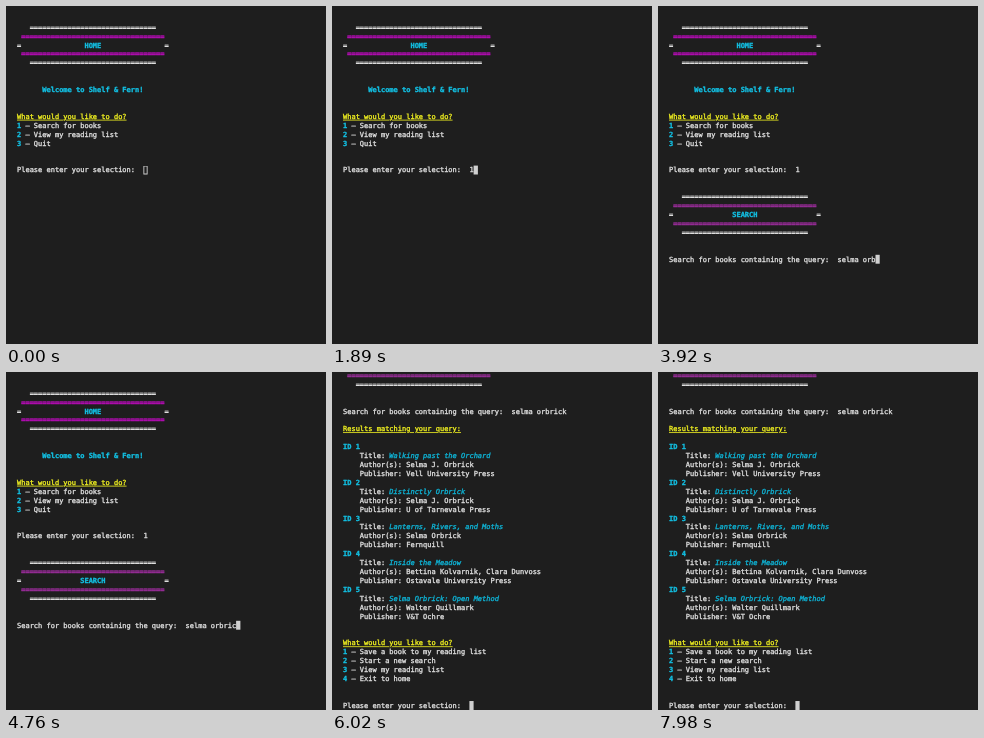
An HTML page that plays this animation: 320 by 338 pixels, repeating every 8000 ms.

```html
<!DOCTYPE html>
<html lang="en">
<head>
<meta charset="utf-8">
<title>Reading list terminal</title>
<style>
  html, body { margin: 0; width: 100%; height: 100%; overflow: hidden; background: #1e1e1e; }
  /* Set at ten times the size, so that the small cell grid stays exact. */
  #screen {
    position: absolute; left: 11px; top: -0.9px; margin: 0;
    font: 70px/89.2px "DejaVu Sans Mono", monospace;
    color: #dedede; white-space: pre;
    text-rendering: geometricPrecision;
    -webkit-text-stroke: 3.5px currentColor;
    transform-origin: 0 0;
  }
  b { color: #12bfe2; }
  i { color: #0eb2d4; }
  u { color: #f0f020; text-decoration-thickness: 8px; text-underline-offset: 9px; }
  .home, .search { font-weight: bold; -webkit-text-stroke-width: 5px; }
  .home { color: #b40cb4; }
  .search { color: #982c98; }
  .cursor { display: inline-block; width: 1ch; height: 89.2px; vertical-align: top; background: #cfcfcf; }
  .cursor.hollow { background: none; box-shadow: inset 0 0 0 9px #cfcfcf; }
</style>
</head>
<body>
<pre id="screen"></pre>
<script>
const LOOP = 8000, ROWS = 38, ROW_HEIGHT = 8.92;
const FOCUS = 980, PICK = 1610, OPEN_SEARCH = 2100, SUBMIT = 5040, RESULTS = 6020;
const QUERY = 'selma orbrick';
const KEY_TIMES = [2800, 2940, 3080, 3220, 3290, 3430, 3570, 3710, 3850, 4130, 4620, 4760, 4830];

const gap = n => ' '.repeat(n);
const bar = n => '='.repeat(n);

function banner(title, tone) {
  const left = Math.floor((34 - title.length) / 2);
  const outer = gap(3) + bar(30);
  const inner = ` <span class="${tone}">${bar(34)}</span>`;
  const middle = `=${gap(left)}<b>${title}</b>${gap(34 - left - title.length)}=`;
  return [outer, inner, middle, inner, outer].join('\n');
}

const menu = options => '<u>What would you like to do?</u>\n' +
  options.map((text, i) => `<b>${i + 1}</b> – ${text}\n`).join('') +
  '\n\nPlease enter your selection:  ';

const books = [
  ['Walking past the Orchard', 'Selma J. Orbrick', 'Vell University Press'],
  ['Distinctly Orbrick', 'Selma J. Orbrick', 'U of Tarnevale Press'],
  ['Lanterns, Rivers, and Moths', 'Selma Orbrick', 'Fernquill'],
  ['Inside the Meadow', 'Bettina Kolvarnik, Clara Dunvoss', 'Ostavale University Press'],
  ['Selma Orbrick: Open Method', 'Walter Quillmark', 'V&amp;T Ochre'],
];

const bookEntry = ([title, author, publisher], i) =>
  `<b>ID ${i + 1}</b>\n` +
  `    Title: <i>${title}</i>\n` +
  `    Author(s): ${author}\n` +
  `    Publisher: ${publisher}\n`;

const home = '\n\n' + banner('HOME', 'home') +
  `\n\n\n${gap(6)}<b>Welcome to Shelf &amp; Fern!</b>\n\n\n` +
  menu(['Search for books', 'View my reading list', 'Quit']);

const search = '\n\n\n' + banner('SEARCH', 'search') +
  '\n\n\nSearch for books containing the query:  ';

const results = '\n<u>Results matching your query:</u>\n\n' +
  books.map(bookEntry).join('') + '\n\n' +
  menu(['Save a book to my reading list', 'Start a new search', 'View my reading list', 'Exit to home']);

function terminalText(t) {
  let text = home;
  if (t >= PICK) text += '1';
  if (t >= OPEN_SEARCH) text += search + QUERY.slice(0, KEY_TIMES.filter(time => time <= t).length);
  if (t >= SUBMIT) text += '\n';
  if (t >= RESULTS) text += results;
  return text + `<span class="cursor${t < FOCUS ? ' hollow' : ''}"></span>`;
}

const screenEl = document.getElementById('screen');
let shown = '';

function draw() {
  const text = terminalText(performance.now() % LOOP);
  if (text !== shown) {
    shown = text;
    screenEl.innerHTML = text;
    const scrolled = Math.max(0, text.split('\n').length - ROWS);
    screenEl.style.transform = `translateY(${-scrolled * ROW_HEIGHT}px) scale(0.1)`;
  }
  requestAnimationFrame(draw);
}
draw();
</script>
</body>
</html>
```
